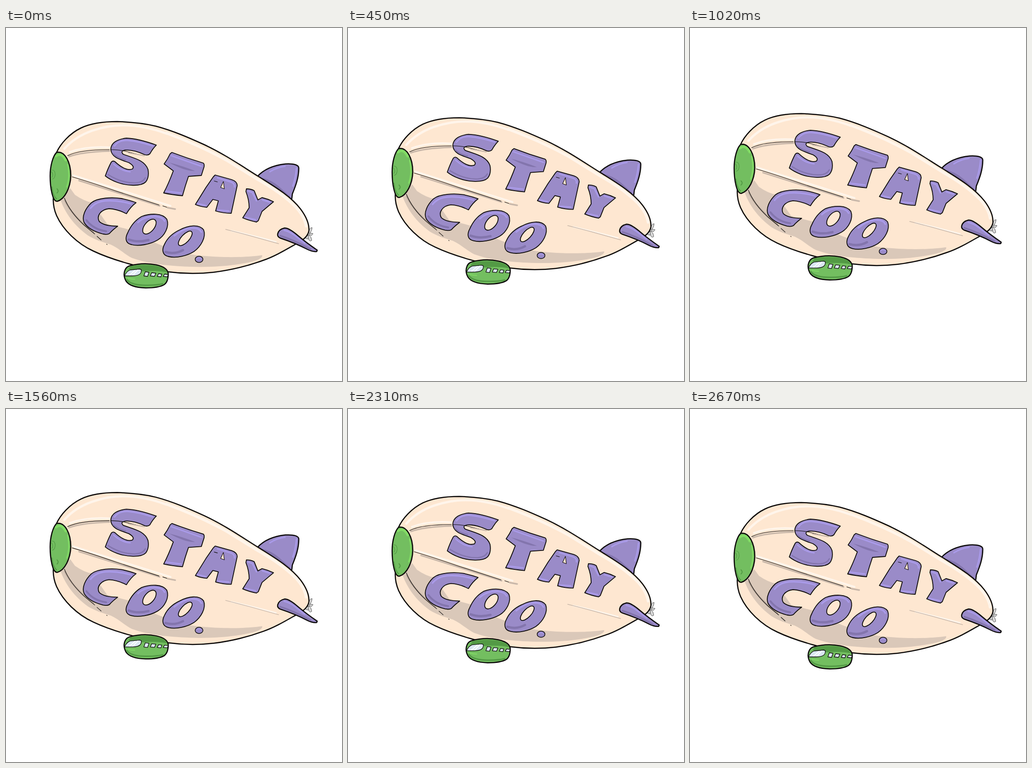
An HTML page that plays this animation: 731 by 766 pixels, repeating every 2.7 s.

```html
<!DOCTYPE html>
<html lang="en">
<head>
<meta charset="utf-8">
<title>Airship</title>
<style>
  html, body { margin: 0; width: 100%; height: 100%; overflow: hidden; background: #fff; }
  svg { display: block; width: 100%; height: 100%; }
  path, ellipse, circle { stroke-linejoin: round; stroke-linecap: round; }
  .ink { stroke: #0b0908; stroke-width: 1.8; }
  .bold { stroke-width: 2.5; }
  .thin { stroke-width: 1.1; }
  .line { fill: none; }
  .cream { fill: #fee7d1; }
  .shade { fill: #dac8b9; }
  .purple { fill: #9a8bc8; }
  .dusk { fill: #8375ad; }
  .green { fill: #73be60; }
  .moss { fill: #539a45; }
  .glass { fill: #dae7f2; stroke-width: 1.3; }
  .soft { fill: none; stroke: #fff5eb; stroke-width: 6; }
  .fold { fill: none; stroke: #c9b8aa; stroke-width: 3.5; }
  .lilac { fill: none; stroke: #aa9bea; stroke-width: 4; }
  .plum { fill: none; stroke: #8375ad; stroke-width: 3; }
  .lime { fill: none; stroke: #82dc65; stroke-width: 5; }
  .leaf { fill: none; stroke: #539a45; stroke-width: 3; }
</style>
</head>
<body>
<svg viewBox="0 0 731 766" role="img" aria-label="STAY COO.">
  <defs>
    <path id="hull" d="M110 270C118 252 138 229 163 217C186 206 214 203 242 203C273 204 301 207 326 213C364 223 400 239 431 253C476 274 512 299 549 322C579 341 618 363 641 393C653 409 660 425 659 440C657 451 646 461 632 468C609 481 584 496 560 504C522 518 483 526 452 530C417 534 382 533 352 529C322 525 292 519 265 511C237 503 209 493 190 484C155 468 124 438 110 407C104 393 102 381 103 367Z"/>
    <clipPath id="inHull"><use href="#hull"/></clipPath>
  </defs>
  <g id="ship">
    <!-- propeller -->
    <g fill="#d9d9d9" stroke="#555" stroke-width="1">
      <path d="M658 444Q659 434 666 433Q666 439 661 446Z"/>
      <path d="M661 445L668 446L665 450L660 449Z"/>
      <path d="M657 448Q665 452 665 461Q660 465 658 457Z"/>
      <path d="M653 451L658 450L657 458L653 457Z"/>
    </g>

    <!-- upper fin -->
    <path class="ink bold purple" d="M547 322C560 308 580 298 608 295C626 294 637 297 637 304C637 325 630 343 623 360L621 377Z"/>
    <path class="dusk" d="M553 324Q577 329 594 344L618 366L619 374Z"/>
    <path class="lilac" d="M574 312Q590 302 607 300M632 304Q630 326 624 343" style="stroke-width:3"/>

    <!-- hull -->
    <use href="#hull" class="cream"/>
    <g clip-path="url(#inHull)">
      <path class="shade" d="M119 374Q129 354 140 348L150 362Q170 376 188 379L220 425L266 437C302 458 340 474 386 488C430 498 510 500 557 493Q560 498 545 504C510 515 454 520 400 518C350 516 310 512 274 499C258 491 246 478 228 470C208 464 193 459 178 450C148 428 129 402 119 374Z"/>
      <path class="soft" d="M127 262Q150 236 187 223Q222 211 255 211Q300 211 349 229" style="stroke-width:5"/>
      <path class="soft" d="M349 228Q420 254 480 287L548 329Q600 358 631 389Q650 410 653 430"/>
    </g>
    <use href="#hull" class="ink bold line"/>

    <!-- seams -->
    <path class="soft" d="M139 269Q174 256 224 259" style="stroke-width:4"/>
    <path class="fold" d="M137 279Q164 269 225 267"/>
    <path class="ink thin line" d="M134 277Q160 264 225 264"/>
    <path class="soft" d="M147 320Q185 332 240 349L358 386" style="stroke-width:4"/>
    <path class="fold" d="M159 331Q210 347 245 358L334 386M352 390L368 393"/>
    <path class="ink thin line" d="M144 323Q185 335 240 354L333 384M341 386L350 389"/>
    <path class="fold" d="M128 374Q143 407 190 443" style="stroke:#b9a89b"/>
    <path class="ink thin line" d="M127 369Q139 399 169 427L193 447M198 452L207 460M219 469L220 470"/>
    <path class="soft" d="M490 440Q535 450 587 464" style="stroke-width:3.5"/>
    <path class="fold" d="M478 437L528 450L593 468" style="stroke-width:1.5"/>

    <!-- nose -->
    <path class="ink bold green" d="M110 270C128 266 141 291 141 321C140 347 128 371 112 376C101 378 96 345 96 321C96 299 102 278 110 270Z"/>
    <path class="lime" d="M109 278Q120 269 130 287"/>
    <path class="lime" d="M134 296Q140 323 132 345" style="stroke-width:2.5"/>
    <path class="leaf" d="M100 345Q102 364 110 371M111 349Q116 354 111 358" style="stroke-width:2"/>
    <path class="leaf" d="M100 308Q107 308 107 318Q106 327 101 328M99 312Q104 318 100 324" style="stroke-width:1.2"/>

    <!-- gondola -->
    <path class="ink bold green" d="M269 516Q299 508 327 514Q351 519 353 533Q353 551 344 557Q332 564 304 564Q270 563 261 549Q254 536 259 525Q262 518 269 516Z"/>
    <path class="moss" d="M271 517Q298 511 326 516Q348 520 350 530Q327 525 296 528L291 523L266 524Z"/>
    <path class="leaf" d="M263 546Q271 557 297 558Q325 559 341 555"/>
    <path class="lime" d="M265 543Q272 545 280 545" style="stroke-width:2"/>
    <path class="ink glass" d="M258 538Q262 528 270 525L291 523Q297 524 293 532Q289 538 274 538Z"/>
    <path d="M269 536L281 526M276 536L287 525" stroke="#fff" stroke-width="2"/>
    <path class="ink glass" d="M303 529L311 530L308 539L300 538ZM317 531L326 532L323 539L314 538ZM332 533L339 534L337 540L329 539ZM345 534L353 535L351 540L342 539Z"/>

    <!-- S -->
    <path class="ink purple" d="M327 254Q319 262 313 273Q309 277 302 275C287 268 272 264 259 265Q248 267 255 274C280 283 302 287 309 307Q312 324 304 334C293 345 261 342 242 335Q226 329 216 321Q222 304 229 291Q232 287 237 290C250 302 264 310 275 306Q281 300 267 292C247 285 230 281 228 264C228 248 244 241 262 239Q288 240 327 254Z"/>
    <path class="lilac" d="M236 256Q245 243 265 244Q289 246 319 256M234 295Q252 311 270 312" style="stroke-width:3"/>
    <path class="plum" d="M222 318Q252 337 282 336Q298 335 303 325M233 273Q245 283 260 286" style="stroke-width:2.5"/>
    <path class="ink thin line" d="M229 264Q245 264 258 267L299 277"/>
    <path class="fold" d="M267 271L301 277" style="stroke-width:2.5"/>

    <!-- T -->
    <path class="ink purple" d="M361 270Q395 283 429 293Q432 295 431 301L425 320L397 322Q390 342 384 364Q362 362 343 358Q354 337 364 310L344 295Q352 284 357 273Z"/>
    <path class="dusk" d="M355 292Q380 298 411 310Q392 312 355 292Z"/>
    <path class="lilac" d="M360 277L425 300M348 354L381 358" style="stroke-width:3"/>

    <!-- A -->
    <path class="ink purple" d="M455 319L491 329Q503 333 503 342L490 402Q472 402 456 397L462 375L450 372L437 389Q423 388 412 383L435 346L451 323Z"/>
    <path class="ink thin cream" d="M473 333L467 346L475 349Z"/>
    <path class="lilac" d="M460 325L489 334Q498 337 497 345M417 381L434 385M461 395L485 397" style="stroke-width:3"/>
    <path class="ink thin line" d="M453 332L460 334"/>

    <!-- Y -->
    <path class="ink purple" d="M523 349Q533 349 540 353L548 373L557 368Q570 371 582 377L557 398L549 418L545 421Q529 418 515 412L529 390Q529 373 522 355Z"/>
    <path class="lilac" d="M527 354L536 357L545 375M558 373L574 378M521 411L543 416" style="stroke-width:3"/>

    <!-- C -->
    <path class="ink purple" d="M283 379Q271 388 262 403Q243 393 224 392C206 394 196 408 203 420Q214 430 243 430Q232 438 225 446Q220 449 211 447C192 442 177 434 170 422C164 409 173 391 186 379C200 368 231 367 251 370Q270 374 283 379Z"/>
    <path class="lilac" d="M184 391Q195 377 216 375Q244 373 273 382" style="stroke-width:3.5"/>
    <path class="plum" d="M175 417Q190 437 218 441" style="stroke-width:4"/>

    <!-- O -->
    <path class="ink purple" d="M295 409C314 402 340 401 350 415C356 431 345 451 330 460C313 470 288 474 273 470C259 467 259 455 265 444C271 430 281 417 295 409Z"/>
    <path class="plum" d="M267 459Q287 466 310 460" style="stroke-width:5"/>
    <path class="lilac" d="M287 422Q301 409 322 409Q340 409 345 419" style="stroke-width:3.5"/>
    <ellipse class="ink cream" cx="312" cy="431" rx="10.500" ry="19" transform="rotate(40 312 431)"/>

    <!-- O -->
    <path class="ink purple" d="M378 438C397 428 420 425 430 438C436 454 424 474 409 485C395 494 371 500 354 496C339 493 339 480 345 469C351 456 363 445 378 438Z"/>
    <path class="plum" d="M347 486Q367 492 385 482" style="stroke-width:5"/>
    <path class="lilac" d="M366 451Q384 436 403 434Q421 433 425 443" style="stroke-width:3.5"/>
    <ellipse class="ink cream" cx="390" cy="456.500" rx="8.500" ry="20" transform="rotate(43 390 456.500)"/>

    <!-- full stop -->
    <ellipse class="ink purple" cx="420" cy="502" rx="8.500" ry="6.800" style="stroke-width:1.500"/>
    <path class="lilac" d="M416 500Q420 497 424 500" style="stroke-width:2"/>

    <!-- lower fin -->
    <path class="ink bold purple" d="M591 447Q593 437 606 434Q615 434 631 447Q652 465 677 482L676 485Q667 486 655 480Q630 467 597 456Q590 453 591 447Z"/>
    <path class="plum" d="M597 451Q628 461 662 480" style="stroke-width:4"/>
    <path class="lilac" d="M605 439Q616 441 628 450L650 467" style="stroke-width:3"/>
  </g>
</svg>
<script>
  const LOOP = 2700, TICK = 30, LIFT = 22.2, STEP = LIFT / 40;
  const TOP = 1800, DROP = 1920, FALL = 2205, SPEED = 0.0365;
  const ship = document.getElementById("ship");

  // Rise slows to a hover, then the fall gathers speed and stays steady.
  function height(t) {
    if (t < TOP) return LIFT * Math.sin(t / TOP * Math.PI / 2);
    if (t < DROP) return LIFT;
    const ramp = Math.min(t, FALL) - DROP;
    const lost = SPEED * ramp * ramp / (2 * (FALL - DROP)) + SPEED * Math.max(0, t - FALL);
    return Math.max(0, LIFT - lost);
  }

  function draw(now) {
    const t = Math.floor(now % LOOP / TICK) * TICK;
    const y = Math.round(height(t) / STEP) * STEP;
    ship.setAttribute("transform", `translate(0 ${-y})`);
    requestAnimationFrame(draw);
  }
  draw(performance.now());
</script>
</body>
</html>
```
